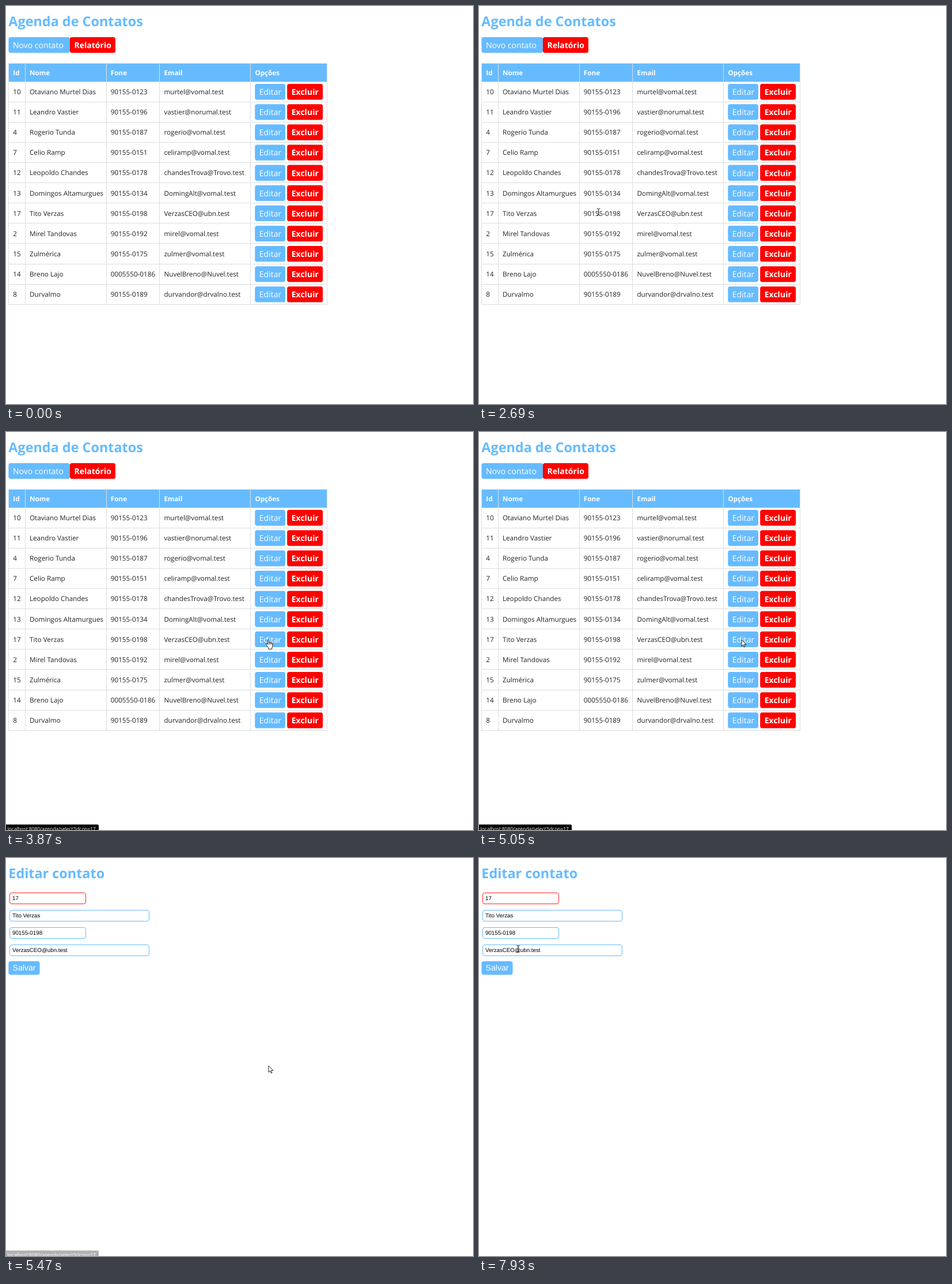
An HTML page that plays this animation: 811x690 px, repeating every 8000 ms.

```html
<!DOCTYPE html>
<html lang="pt-BR">
<head>
<meta charset="utf-8">
<title>Agenda de Contatos</title>
<style>
  html, body { margin: 0; width: 100%; height: 100%; overflow: hidden; background: #fff; }
  svg { display: block; width: 100vw; height: 100vh; }
  text { font: 11.7px "Open Sans", sans-serif; fill: #222; white-space: pre; text-rendering: geometricPrecision; }
  .title { font-size: 23.4px; font-weight: 700; fill: #6bf; }
  .head { font-weight: 700; fill: #fff; }
  .button { font-size: 14.05px; fill: #fff; }
  .bold { font-weight: 700; }
  .input { font: 9.76px "Liberation Sans", Arial, sans-serif; fill: #000; }
  .save { font: 14.05px "Liberation Sans", Arial, sans-serif; fill: #fff; }
  .link { font-size: 8.4px; fill: #fff; }
  .grid { stroke: #ddd; fill: none; shape-rendering: crispEdges; }
  .pointer { fill: #fff; stroke: #111; stroke-width: 1.25; stroke-linejoin: round; }
</style>
</head>
<body>
<svg id="stage" viewBox="0 0 811 690"></svg>
<script>
const LOOP = 8000, STEP = 40, ROW = 35.12;
const BLUE = '#6bf', RED = '#f00';

const contacts = [
  [10, 'Otaviano Murtel Dias', '90155-0123', 'murtel@vomal.test'],
  [11, 'Leandro Vastier', '90155-0196', 'vastier@norumal.test'],
  [4, 'Rogerio Tunda', '90155-0187', 'rogerio@vomal.test'],
  [7, 'Celio Ramp', '90155-0151', 'celiramp@vomal.test'],
  [12, 'Leopoldo Chandes', '90155-0178', 'chandesTrova@Trovo.test'],
  [13, 'Domingos Altamurgues', '90155-0134', 'DomingAlt@vomal.test'],
  [17, 'Tito Verzas', '90155-0198', 'VerzasCEO@ubn.test'],
  [2, 'Mirel Tandovas', '90155-0192', 'mirel@vomal.test'],
  [15, 'Zulmérica', '90155-0175', 'zulmer@vomal.test'],
  [14, 'Breno Lajo', '0005550-0186', 'NuvelBreno@Nuvel.test'],
  [8, 'Durvalmo', '90155-0189', 'durvandor@drvalno.test']
];

const text = (x, y, str, cls = '') => `<text x="${x}" y="${y}" class="${cls}">${str}</text>`;
const box = (x, y, w, h, fill, r = 0, stroke = 'none') =>
  `<rect x="${x}" y="${y}" width="${w}" height="${h}" rx="${r}" fill="${fill}" stroke="${stroke}"/>`;
const button = (x, y, w, label, color, cls = '') =>
  box(x, y, w, 27.3, color, 3.7) + text(x + 7.5, y + 19, label, 'button ' + cls);
const input = (y, w, value, color) =>
  box(6.5, y + .5, w, 19, '#fff', 3.5, color) + text(11, y + 13.3, value, 'input');

const columns = [4, 33, 174, 266, 424, 557];
const textX = [12.3, 41, 181.8, 274.4, 432.4];

function tablePage() {
  let out = text(4.3, 35, 'Agenda de Contatos', 'title') +
    button(4.4, 54, 106.5, 'Novo contato', BLUE) +
    button(110.9, 54, 79.1, 'Relatório', RED, 'bold') +
    box(4.4, 99.8, 553.4, 31.4, BLUE);
  let lines = 'M4 99.5H558';
  for (let i = 0; i <= contacts.length; i++) lines += `M4 ${Math.floor(131 + ROW * i) + .5}H558`;
  columns.forEach(x => lines += `M${x + .5} 99V518`);
  out += `<path class="grid" d="${lines}"/>`;
  ['Id', 'Nome', 'Fone', 'Email', 'Opções'].forEach((h, i) => out += text(textX[i], 119.5, h, 'head'));
  contacts.forEach((contact, i) => {
    const y = ROW * i;
    contact.forEach((value, c) => out += text(textX[c], 153 + y, value));
    out += button(432.3, 135.1 + y, 52.7, 'Editar', BLUE) +
      button(488.2, 135.1 + y, 62, 'Excluir', RED, 'bold');
  });
  return out;
}

function formPage() {
  const [id, name, phone, email] = contacts[6];
  return text(4.3, 35, 'Editar contato', 'title') +
    input(60, 132, id, '#f22') + input(90, 242, name, BLUE) +
    input(120, 132, phone, BLUE) + input(150, 242, email, BLUE) +
    box(4.4, 179, 54.1, 23.5, BLUE, 3.7) + text(11.6, 195.4, 'Salvar', 'save');
}

// Each pointer is drawn with its hot spot at 0,0.
const pointers = {
  arrow: `<path class="pointer" transform="scale(.732)"
    d="M.7 1V16.4L4.2 13L6.6 18.5L9 17.5L6.6 12.1H11.6Z"/>`,
  hand: `<path class="pointer" transform="scale(.732) translate(-6.5 0)"
    d="M5 12V2.2a1.5 1.5 0 0 1 3 0V8c0-1.3 3-1.3 3 .4 0-1.2 2.7-1.2 2.8.6 0-1 2.7-1 2.7.9V15c0 3-1.5 4-1.5 6.5V23H7V21.5c0-2.2-2-4-3.5-6.5L1.2 11.6c-.8-1.6 1-2.6 2.2-1.4L5 12M8 8v4M11 8.5v3.5M13.8 9v3"/>`,
  beam: `<path fill="none" stroke="#111" d="M-2.7-5.4H-1Q0-5.4 0-4.4Q0-5.4 1-5.4H2.7M0-4.6V4.6M-2.7 5.4H-1Q0 5.4 0 4.4Q0 5.4 1 5.4H2.7"/>`
};

const path = [
  [810, 780, 680, 'arrow'], [1010, 705, 612, 'arrow'], [1210, 548, 480, 'hand'],
  [1450, 427.5, 379, 'hand'], [1490, 384, 362, 'arrow'], [1530, 366, 356, 'beam'],
  [1610, 351, 352, 'beam'], [1650, 347, 350, 'beam'], [1890, 257, 317, 'arrow'],
  [2130, 257, 317, 'arrow'], [2290, 232, 331, 'beam'], [2530, 197, 352, 'beam'],
  [2690, 207.5, 357, 'beam'], [2850, 272, 363, 'arrow'], [2930, 296, 364, 'arrow'],
  [3010, 310, 365, 'beam'], [3250, 400, 367, 'arrow'], [3370, 434, 364, 'hand'],
  [3530, 452.5, 360, 'hand'], [3730, 455.5, 359.5, 'hand'], [4730, 455.5, 359.5, 'arrow'],
  [5530, 455.5, 359.5, 'arrow'], [5730, 290, 230, 'arrow'], [5850, 150, 146, 'beam'],
  [6010, 66, 105, 'beam'], [6450, 66, 105, 'beam'], [6690, 64, 130, 'beam'],
  [6930, 68, 156, 'beam'], [7090, 68, 156, 'beam'], [7250, 55, 150, 'beam'],
  [7410, 58, 162, 'beam'], [7570, 61, 161, 'beam'], [7770, 61, 161, 'beam'],
  [7930, 68, 157.5, 'beam']
];
const barSteps = [[0, 0], [3680, .3], [3730, .6], [3820, .85], [3870, 1], [5390, .7], [5470, .3], [5550, 0]];

const lastAt = (list, t) => list.findLastIndex(step => step[0] <= t);

document.getElementById('stage').innerHTML =
  `<g id="table">${tablePage()}</g><g id="form">${formPage()}</g>
   <g id="bar">${box(-4, 680.5, 165, 14, '#000', 2)}${text(2.5, 691, 'localhost:8080/agenda/select?idcon=17', 'link')}</g>
   <g id="cursor">${Object.entries(pointers).map(([kind, art]) => `<g id="${kind}">${art}</g>`).join('')}</g>`;
const [table, form, bar, cursor] = ['table', 'form', 'bar', 'cursor'].map(id => document.getElementById(id));
const show = (el, on) => el.style.display = on ? '' : 'none';

function drawCursor(t) {
  const tick = Math.floor((t - 10) / STEP) * STEP + 10;
  const i = lastAt(path, tick);
  show(cursor, i >= 0);
  if (i < 0) return;
  const [t0, x0, y0, kind] = path[i];
  const [t1, x1, y1] = path[i + 1] || [LOOP, x0, y0];
  const k = (tick - t0) / (t1 - t0);
  cursor.setAttribute('transform', `translate(${x0 + (x1 - x0) * k} ${y0 + (y1 - y0) * k})`);
  for (const el of cursor.children) show(el, el.id === kind);
}

const start = performance.now();
function draw() {
  const t = (performance.now() - start) % LOOP;
  show(table, t < 5110);
  show(form, t >= 5110);
  bar.setAttribute('opacity', barSteps[lastAt(barSteps, t)][1]);
  drawCursor(t);
  requestAnimationFrame(draw);
}
draw();
</script>
</body>
</html>
```
